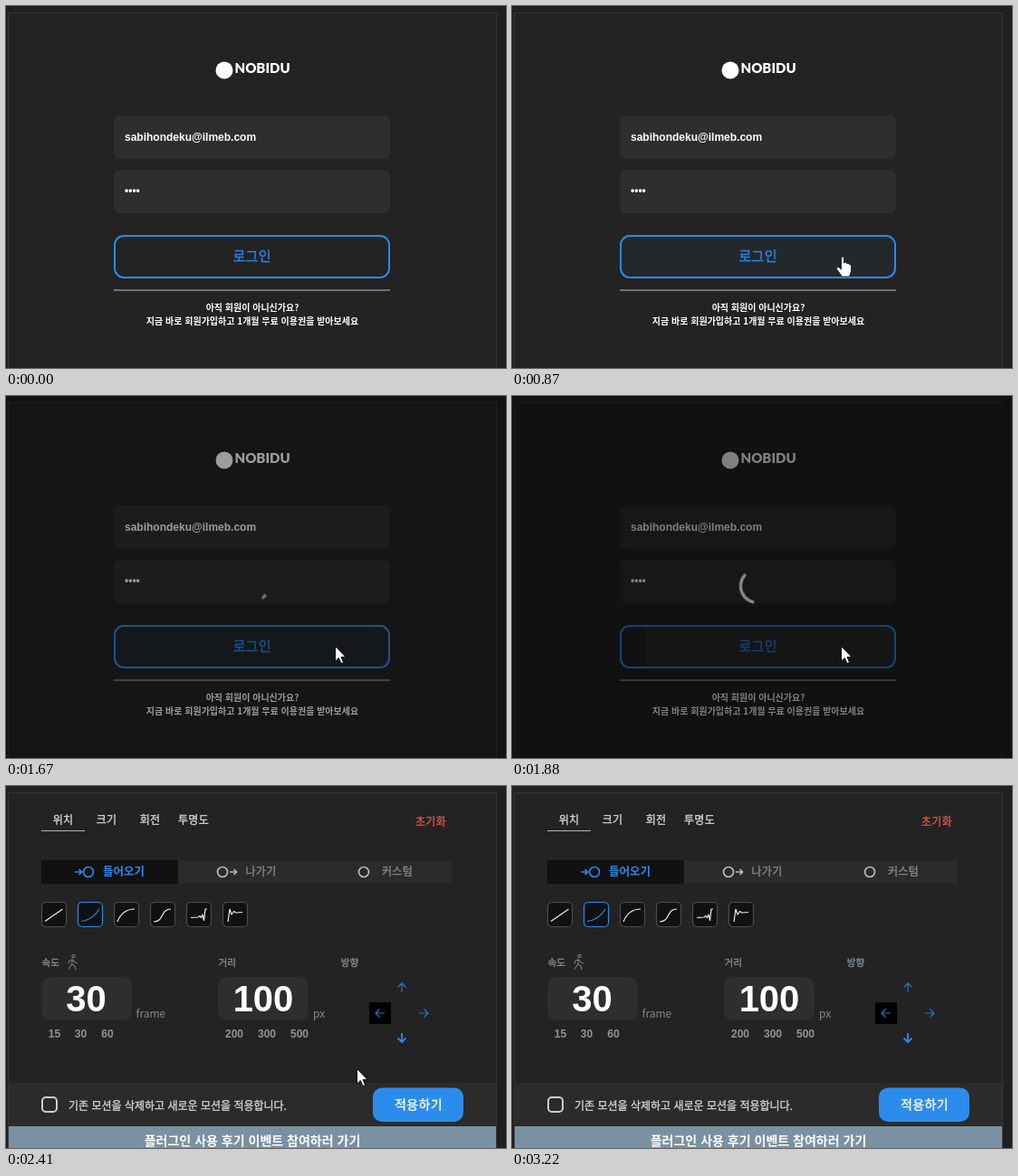
Animation, 552 px wide and 400 px high, one loop 3290 ms. Source, as an HTML page:

```html
<!DOCTYPE html>
<html lang="ko">
<head>
<meta charset="utf-8">
<title>Login to editor</title>
<style>
html, body { margin: 0; width: 100%; height: 100%; overflow: hidden; background: #202020; }
svg { display: block; width: 552px; height: 400px; }
text {
  font-family: "Noto Sans CJK KR", "Noto Sans KR", "Noto Sans CJK JP", "Noto Sans CJK", sans-serif;
  font-size: 12px; color: #888; fill: currentColor;
}
.mid { text-anchor: middle; }
.arial { font-family: "Liberation Sans", Arial, sans-serif; font-weight: 700; }
.medium { stroke: currentColor; stroke-width: .35px; }
.white { color: #fff; }
.brand { font: 900 15px Lato, sans-serif; }
.note { font-size: 10px; font-weight: 700; }
.tab { color: #d4d4d4; letter-spacing: .3px; }
.mode { letter-spacing: .3px; }
.label { font-size: 10.6px; }
.number { font-size: 40px; }
.preset { color: #929292; }
.login-label { font-size: 15px; letter-spacing: .4px; color: #2b82e6; }
.apply-label { font-size: 14px; letter-spacing: .4px; }
.field { fill: #2e2e2e; }
.line { fill: none; stroke-width: 1.2; stroke-linejoin: round; }
.blue { stroke: #2b89ec; }
.dim { stroke: #2874bd; }

/* Everything shares one 3290 ms loop and changes in held steps. */
.login, .editor, .late, .hover, .press, .backdrop, .spinner, .cursor, .arrow, .hand {
  animation: 3290ms step-end infinite;
}
.login { animation-name: login; }
.editor { animation-name: editor; }
.late { animation-name: late; }
.hover { animation-name: hover; }
.press { animation-name: press; }
.backdrop { animation-name: backdrop; }
.spinner { animation-name: spinner; }
.cursor { animation-name: cursor; }
.arrow { animation-name: arrow; }
.hand { animation-name: hand; }

@keyframes login { 0% { visibility: visible; } 59.27%, 100% { visibility: hidden; } }
@keyframes editor { 0% { visibility: hidden; } 59.27%, 100% { visibility: visible; } }
@keyframes late { 0% { opacity: 0; } 63.221%, 100% { opacity: 1; } }
@keyframes press { 0% { opacity: 0; } 44.376% { opacity: 1; } 48.632%, 100% { opacity: 0; } }
@keyframes arrow { 0% { opacity: 1; } 20.06% { opacity: 0; } 48.632%, 100% { opacity: 1; } }
@keyframes hand { 0% { opacity: 0; } 20.06% { opacity: 1; } 48.632%, 100% { opacity: 0; } }
@keyframes hover {
  0% { opacity: 0; fill: #23282c; clip-path: inset(0); }
  20.06% { opacity: .15; fill: #23282c; clip-path: inset(0); }
  22.188% { opacity: .6; fill: #23282c; clip-path: inset(0); }
  24.316% { opacity: .9; fill: #23282c; clip-path: inset(0); }
  26.443% { opacity: 1; fill: #23282c; clip-path: inset(0); }
  52.887%, 100% { opacity: 1; fill: #2a2a2a; clip-path: inset(0 0 0 27px); }
}
@keyframes backdrop {
  0% { opacity: 0; }
  48.632% { opacity: .1; }
  50.759% { opacity: .78; }
  52.887% { opacity: .97; }
  55.015%, 100% { opacity: 1; }
}
@keyframes spinner {
  0% { transform: rotate(0deg); stroke-dasharray: 0 200; stroke-dashoffset: 0; }
  48.632% { transform: rotate(10.8deg); stroke-dasharray: 1.8 200; stroke-dashoffset: -.1; }
  50.759% { transform: rotate(28.8deg); stroke-dasharray: 6.3 200; stroke-dashoffset: -.8; }
  52.887% { transform: rotate(46.8deg); stroke-dasharray: 14.7 200; stroke-dashoffset: -2.1; }
  55.015% { transform: rotate(64.8deg); stroke-dasharray: 26.7 200; stroke-dashoffset: -3.9; }
  57.142%, 100% { transform: rotate(82.8deg); stroke-dasharray: 43.6 200; stroke-dashoffset: -6.5; }
}
@keyframes cursor {
  0% { transform: translate(600px, 420px); }
  13.677% { transform: translate(487px, 366px); }
  15.805% { transform: translate(434px, 331px); }
  17.933% { transform: translate(393px, 307px); }
  20.06% { transform: translate(375px, 291px); }
  22.188% { transform: translate(366px, 280px); }
  24.316% { transform: translate(363px, 276px); }
  73.252% { transform: translate(387px, 312px); }
  75.683% { transform: translate(452px, 372px); }
  77.811%, 100% { transform: translate(600px, 420px); }
}
</style>
</head>
<body>
<svg viewBox="0 0 552 400">
  <defs>
    <path id="dir" d="M-5 0H5M.5-4.5 5 0 .5 4.5"/>
    <rect id="tile" x=".5" y=".5" width="27" height="27" rx="4.5" fill="#111"/>
  </defs>
  <rect width="552" height="400" fill="#202020"/>
  <rect x="2.5" y="7.5" width="539" height="420" fill="#232323" stroke="#353535"/>

  <g class="login">
    <circle cx="241" cy="71" r="9.5" fill="#fff"/>
    <text class="brand white" x="252.5" y="74">NOBIDU</text>
    <rect class="field" x="119" y="121" width="305" height="48" rx="7"/>
    <rect class="field" x="119" y="181" width="305" height="48" rx="7"/>
    <text class="arial white" x="131" y="149">sabihondeku@ilmeb.com</text>
    <text class="arial white" x="131" y="208">••••</text>
    <rect class="hover" x="121" y="255" width="301" height="44" rx="8"/>
    <rect class="blue" x="120" y="254" width="303" height="46" rx="10" fill="none" stroke-width="2"/>
    <text class="login-label medium mid" x="271.7" y="282">로그인</text>
    <rect x="119" y="313" width="305" height="2" fill="#707070"/>
    <text class="note white mid" x="272" y="337">아직 회원이 아니신가요?</text>
    <text class="note white mid" x="272" y="352">지금 바로 회원가입하고 1개월 무료 이용권을 받아보세요</text>
    <circle class="press" cx="363" cy="276" r="12" fill="#8b8714"/>
    <g class="backdrop">
      <rect width="552" height="400" fill="#000" fill-opacity=".5"/>
      <g transform="translate(270.8 210)">
        <circle class="spinner" r="18.3" pathLength="127" fill="none" stroke="#8a8a8a" stroke-width="3.3"/>
      </g>
    </g>
  </g>

  <g class="editor">
    <g class="mid">
      <text class="tab medium" x="63" y="41.5">위치</text>
      <text class="tab medium" x="111" y="41.5">크기</text>
      <text class="tab medium" x="159" y="41.5">회전</text>
      <text class="tab medium" x="207" y="41.5">투명도</text>
      <text class="mode medium" x="469" y="43.5" style="color:#dc5547">초기화</text>
    </g>
    <rect x="39" y="49" width="48" height="1" fill="#b8b8b8"/>

    <rect x="39" y="82" width="453" height="26" fill="#2b2b2b"/>
    <rect x="39" y="82" width="151" height="26" fill="#111"/>
    <g fill="none" stroke="#bbb" stroke-width="1.7">
      <g class="blue"><circle cx="91" cy="95" r="5.5"/><path d="M76 95h7M80.5 92l3 3-3 3"/></g>
      <circle cx="239" cy="95" r="5.5"/><path d="M247 95h7M251.5 92l3 3-3 3"/>
      <circle cx="395" cy="95" r="5.5"/>
    </g>
    <text x="107" y="99" style="font-size:12.5px;font-weight:700;color:#2b89ec">들어오기</text>
    <text class="mode medium" x="264.5" y="99">나가기</text>
    <text class="mode medium" x="415" y="99">커스텀</text>

    <g class="line" stroke="#4c4c4c" stroke-width="1">
      <use href="#tile" x="39" y="128"/>
      <use href="#tile" x="79" y="128" class="blue"/>
      <use href="#tile" x="119" y="128"/>
      <use href="#tile" x="159" y="128"/>
      <use href="#tile" x="199" y="128"/>
      <use href="#tile" x="239" y="128"/>
    </g>
    <g class="line" stroke="#eee">
      <path d="M43 149.5 62.5 136"/>
      <path class="blue" d="M83 149.5Q95.5 148 103 136"/>
      <path d="M123 150Q128.500 136 142 136"/>
      <path d="M163 150C175 150 170 136 182 136"/>
      <path d="M204 145.5 212 145 214 143.5 215.5 145.5 217 142 218.5 148.5 220 136H222"/>
      <path d="M245 150 247 136 249 142 251.5 138.5 254 140 261 139.5"/>
    </g>

    <text class="label medium" x="39.4" y="199">속도</text>
    <text class="label medium" x="234.4" y="199">거리</text>
    <text class="label medium" x="369.8" y="199" style="color:#7f8a91">방향</text>
    <g class="late line" stroke="#777">
      <circle cx="74.5" cy="188" r="1.6"/>
      <path d="M73.5 191.5 72.5 197 69 202.5M72.5 196.5 76 199 77 203M73.5 191.5 69.5 193.5 69 196.5M74 192 76 195 79 196"/>
    </g>

    <rect class="field" x="39" y="211" width="100" height="48" rx="10"/>
    <rect class="field" x="234" y="211" width="100" height="48" rx="10"/>
    <text class="arial number white mid" x="88.5" y="249">30</text>
    <text class="arial number white mid" x="284" y="249">100</text>
    <text x="143.5" y="256">frame</text>
    <text x="339" y="256">px</text>
    <g class="mid">
      <text class="arial preset" x="53.5" y="278">15</text>
      <text class="arial preset" x="82.5" y="278">30</text>
      <text class="arial preset" x="112" y="278">60</text>
      <text class="arial preset" x="252" y="278">200</text>
      <text class="arial preset" x="288" y="278">300</text>
      <text class="arial preset" x="324" y="278">500</text>
    </g>

    <rect x="401" y="239" width="24" height="24"/>
    <g class="late line dim">
      <use href="#dir" transform="translate(437 223) rotate(-90)"/>
      <use href="#dir" transform="translate(413 251) rotate(180)"/>
      <use href="#dir" transform="translate(461 251)"/>
      <use href="#dir" class="blue" stroke-width="1.8" transform="translate(437 278) rotate(90)"/>
    </g>

    <rect x="3" y="328" width="538" height="48" fill="#2b2b2b"/>
    <rect x="40" y="344" width="16" height="16" rx="4" fill="none" stroke="#ccc" stroke-width="2"/>
    <text class="medium" x="69" y="357.5" style="color:#d0d0d0">기존 모션을 삭제하고 새로운 모션을 적용합니다.</text>
    <rect x="405" y="333.5" width="100" height="37.5" rx="10" fill="#2c8cec"/>
    <text class="apply-label medium white mid" x="455.5" y="357">적용하기</text>
    <rect x="3" y="376" width="538" height="24" fill="#7a91a2"/>
    <text class="white mid" x="272" y="397" style="font-size:14px;font-weight:700">플러그인 사용 후기 이벤트 참여하러 가기</text>
  </g>

  <g class="cursor" fill="#fff" stroke="#111" stroke-linejoin="round">
    <path class="arrow" d="M.5.5V17L4.3 13.4 7 19.5 9.6 18.4 7 12.4H12Z"/>
    <path class="hand" stroke-width=".8" d="M.5 14V2.5Q.5 1 2 1T3.5 2.5V8Q5.5 6.5 6.5 8.5 8.5 7.5 9.3 9.5 11.5 9 11.5 11.5V17L9.5 23H1.5L-4 15.5Q-5.5 13-3.5 12.5-2 12.2.5 15Z"/>
  </g>
</svg>
</body>
</html>
```
